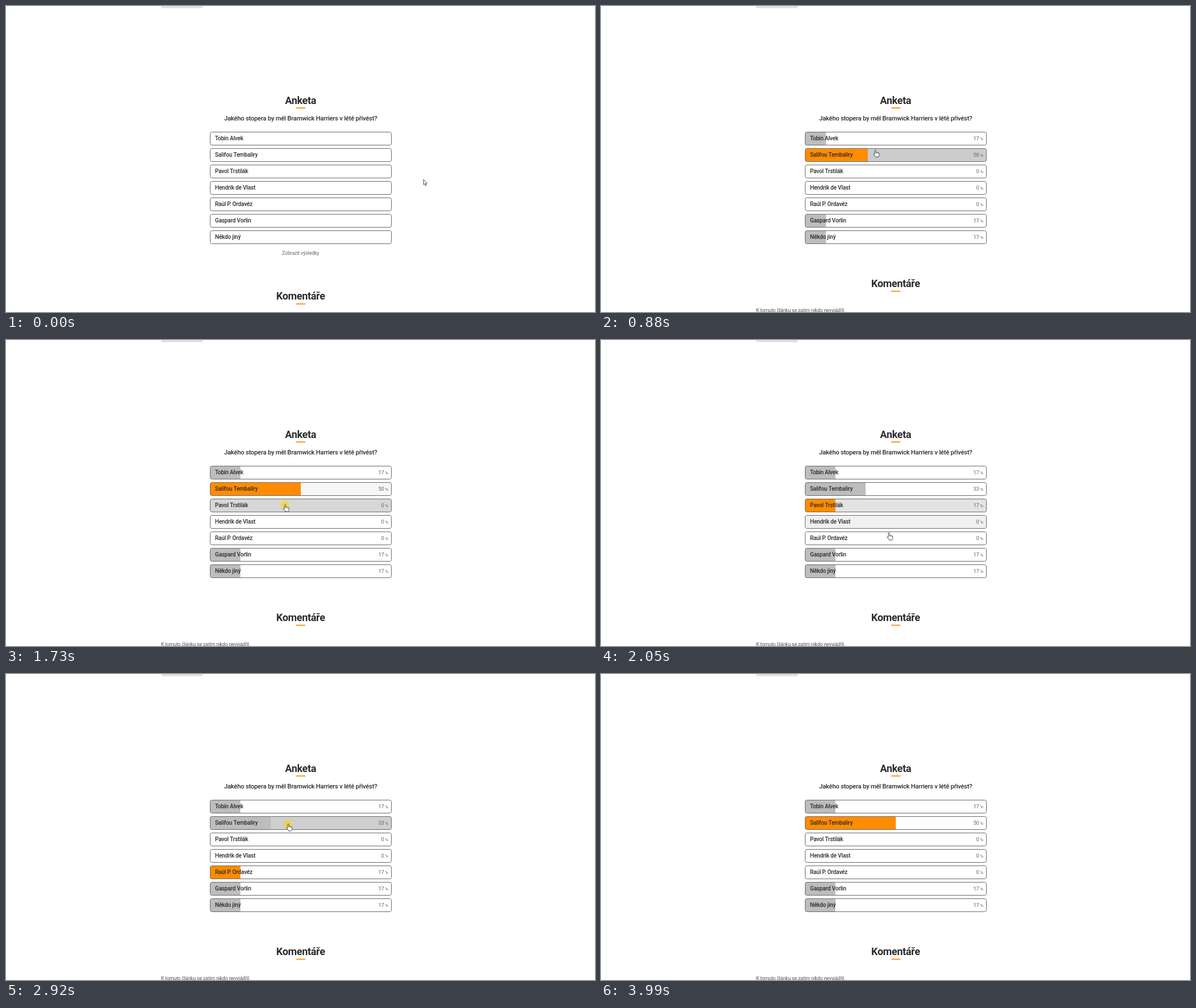
Recreate the animation shown at these times as an HTML page with a canvas. Size 1037 px wide and 540 px high, loop 4150 ms.

```html
<!DOCTYPE html>
<html lang="cs">
<head>
<meta charset="utf-8">
<title>Anketa</title>
<style>
html, body { margin: 0; width: 100%; height: 100%; overflow: hidden; background: #fff; }
canvas { display: block; width: 1037px; height: 540px; }
</style>
</head>
<body>
<canvas id="stage" width="1037" height="540"></canvas>
<script>
const ctx = document.getElementById('stage').getContext('2d');
const LOOP = 4150;
const INK = '#2c2c2c', MUTED = '#666', ORANGE = '#ff8c00', GRAY = '#bdbdbd';
const BOX = { x: 359.5, y: 222.5, w: 319, h: 23, pitch: 29, r: 3 };
const CENTER = 518.7;

// Each option starts with some votes; the visitor adds one to the picked row.
const options = [
  { name: 'Tobin Alvek', votes: 1 },
  { name: 'Salifou Tembaliry', votes: 2 },
  { name: 'Pavol Trstilák', votes: 0 },
  { name: 'Hendrik de Vlast', votes: 0 },
  { name: 'Raúl P. Ordavéz', votes: 0 },
  { name: 'Gaspard Vorlin', votes: 1 },
  { name: 'Někdo jiný', votes: 1 }
];
const TOTAL = 1 + options.reduce((sum, o) => sum + o.votes, 0);

const clicks = [
  { time: 700, row: 1 },
  { time: 1720, row: 2 },
  { time: 2170, row: 4 },
  { time: 2890, row: 1 }
];
const LATENCY = 70, GROW = 250;

// The pointer rests between these moves.
const home = { x: 735, y: 306 };
const moves = [
  { from: 30, to: 560, x: 482, y: 262 },
  { from: 760, to: 870, x: 483, y: 253.5 },
  { from: 1400, to: 1660, x: 491.5, y: 290 },
  { from: 1940, to: 2090, x: 510, y: 350 },
  { from: 2250, to: 2720, x: 497, y: 264 },
  { from: 3125, to: 3300, x: 558, y: 482 },
  { from: 3300, to: 3960, x: 95, y: 545 }
];

const clamp = v => Math.min(1, Math.max(0, v));
const mix = (a, b, k) => a + (b - a) * k;
const smooth = k => k * k * (3 - 2 * k);
const easeOut = k => 1 - (1 - k) ** 2;

function pointerAt(t) {
  return moves.reduce((p, m) => {
    const k = smooth(clamp((t - m.from) / (m.to - m.from)));
    return { x: mix(p.x, m.x, k), y: mix(p.y, m.y, k) };
  }, home);
}

function rowAt({ x, y }) {
  if (x < BOX.x || x > BOX.x + BOX.w) return -1;
  const i = Math.floor((y - BOX.y) / BOX.pitch);
  const inside = y - BOX.y - i * BOX.pitch <= BOX.h;
  return inside && i >= 0 && i < options.length ? i : -1;
}

// Hover shade of every row, sampled once over the loop.
const STEP = 5, FADE = 100;
const shades = [];
let level = options.map(() => 0);
for (let t = 0; t <= LOOP; t += STEP) {
  shades.push(level);
  const over = rowAt(pointerAt(t));
  level = level.map((v, i) => mix(v, i === over ? 1 : 0, 1 - Math.exp(-STEP / FADE)));
}

// Share of a row after a given click; nothing is shown before the first one.
function shareOf(i, click) {
  return click ? (options[i].votes + (click.row === i ? 1 : 0)) / TOTAL : 0;
}

function text(str, x, y, size, weight, color, align = 'left') {
  ctx.font = `${weight} ${size}px Roboto, sans-serif`;
  ctx.letterSpacing = `${-0.018 * size}px`;
  ctx.fillStyle = color;
  ctx.textAlign = align;
  ctx.fillText(str, x, y);
}

function rect(x, y, w, h, color) {
  ctx.fillStyle = color;
  ctx.fillRect(x, y, w, h);
}

function heading(str, y) {
  text(str, CENTER, y, 18, 700, INK, 'center');
  rect(511, y + 6.5, 16, 1.8, ORANGE);
}

function drawRow(i, t, click, previous) {
  const y = BOX.y + i * BOX.pitch;
  const share = shareOf(i, click);
  const grown = click ? easeOut(clamp((t - click.time - LATENCY) / GROW)) : 0;
  const width = BOX.w * mix(shareOf(i, previous), share, grown);
  const tone = Math.round(255 - 51 * shades[Math.floor(t / STEP)][i]);

  ctx.beginPath();
  ctx.roundRect(BOX.x, y, BOX.w, BOX.h, BOX.r);
  ctx.save();
  ctx.clip();
  rect(BOX.x, y, BOX.w, BOX.h, `rgb(${tone},${tone},${tone})`);
  rect(BOX.x, y, width, BOX.h, click?.row === i ? ORANGE : GRAY);
  ctx.restore();
  ctx.strokeStyle = '#686868';
  ctx.lineWidth = 1;
  ctx.stroke();

  text(options[i].name, 368, y + 14.6, 10, 500, INK);
  if (click) {
    text(Math.round(share * 100), 665.7, y + 14.9, 9.4, 400, MUTED, 'right');
    text('%', 673, y + 14.9, 8, 400, MUTED, 'right');
  }
}

const arrow = new Path2D('M0 0V9.4L2.2 7.5L3.7 10.8L5.1 10.2L3.7 7H6.4Z');
const hand = new Path2D('M-1 1Q0 -.6 1 1V5Q2.2 4 3 5.3Q4.2 4.5 5 5.8Q6.6 5.2 6.8 6.8' +
  'V9.2Q6.7 10.6 5.7 11.4V13H.2V11.8L-3 8.2Q-3.6 6.6 -1 7.6Z');
const knuckles = new Path2D('M1 5V7M3 5.4V7.2M5 5.9V7.4');

function drawPointer(t) {
  const p = pointerAt(t);
  if (clicks.some(c => Math.abs(t - c.time) < 45)) {
    ctx.beginPath();
    ctx.arc(p.x - 0.5, p.y + 1, 7.5, 0, Math.PI * 2);
    ctx.fillStyle = 'rgba(255,215,0,.58)';
    ctx.fill();
  }
  const shape = rowAt(p) >= 0 ? hand : arrow;
  ctx.save();
  ctx.translate(p.x, p.y);
  ctx.fillStyle = '#fff';
  ctx.fill(shape);
  ctx.strokeStyle = '#222';
  ctx.lineWidth = 0.8;
  ctx.lineJoin = 'round';
  ctx.stroke(shape);
  if (shape === hand) {
    ctx.lineWidth = 0.5;
    ctx.stroke(knuckles);
  }
  ctx.restore();
}

function draw(t) {
  rect(0, 0, 1037, 540, '#fff');
  ctx.beginPath();
  ctx.roundRect(273, -10, 74, 14, 3);
  ctx.fillStyle = '#e1e1e1';
  ctx.fill();

  heading('Anketa', 172.5);
  text('Jakého stopera by měl Bramwick Harriers v létě přivést?', CENTER, 202.3, 11.2, 500, INK, 'center');

  const last = clicks.findLastIndex(c => t >= c.time + LATENCY);
  const click = clicks[last], previous = clicks[last - 1];
  options.forEach((_, i) => drawRow(i, t, click, previous));

  if (click) {
    heading('Komentáře', 496);
    text('K tomuto článku se zatím nikdo nevyjádřil.', 273, 540, 8.75, 400, '#555');
  } else {
    text('Zobrazit výsledky', CENTER, 438.8, 8.85, 400, MUTED, 'center');
    heading('Komentáře', 518.3);
  }
  drawPointer(t);
}

const start = performance.now();
function tick() {
  draw((performance.now() - start) % LOOP);
  requestAnimationFrame(tick);
}
tick();
</script>
</body>
</html>
```
